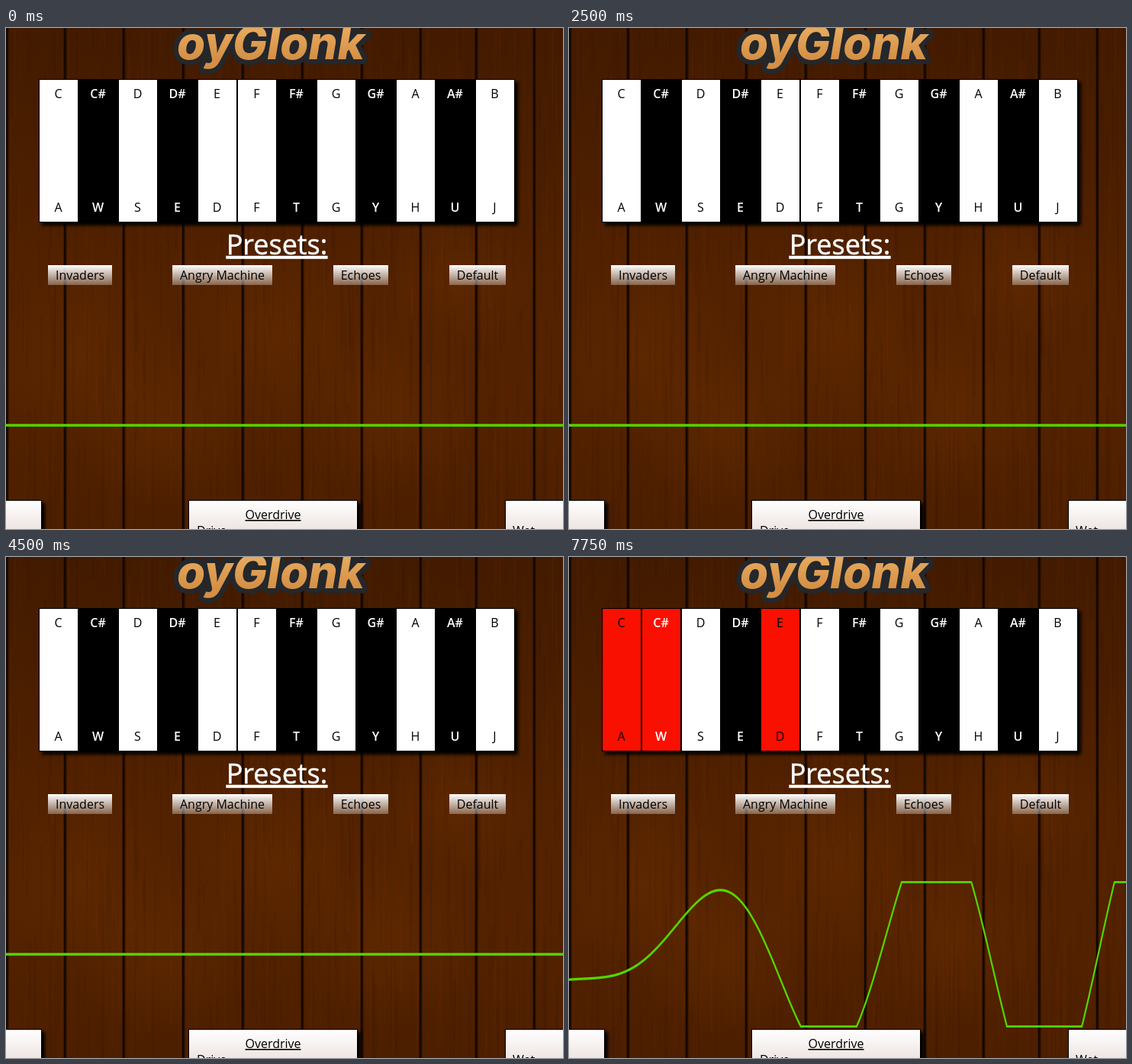
Write an HTML page with a canvas that moves like this. It is 730x657 px and loops after 8000 ms.

```html
<!DOCTYPE html>
<html lang="en">
<head>
<meta charset="utf-8">
<title>Synth keyboard</title>
<style>
  html, body { margin: 0; width: 100%; height: 100%; overflow: hidden; background: #4c1f00; }
  canvas, svg { position: absolute; left: 0; top: 0; }
  text { font: 16px "Open Sans", sans-serif; }
  .mid { text-anchor: middle; }
  .line { text-decoration: underline; }
  .sharp { font-weight: 600; fill: #fff; }
  .title { font-size: 36px; fill: #fff; stroke: #fff; stroke-width: .5px; }
  .logo { font: italic 800 60px Inter, sans-serif; fill: url(#gold); stroke: #24272b;
          stroke-width: 13px; stroke-linejoin: round; paint-order: stroke; }
  .shadow { filter: drop-shadow(4px 4px 2px #000); }
</style>
</head>
<body>
<canvas id="wood" width="730" height="657"></canvas>
<svg width="730" height="657" viewBox="0 0 730 657">
  <defs>
    <linearGradient id="gold" x2="0" y2="1">
      <stop offset=".2" stop-color="#e9ac60"/><stop offset=".8" stop-color="#d48f45"/>
    </linearGradient>
    <linearGradient id="glass" x2="0" y2="1">
      <stop stop-color="#fff"/><stop offset="1" stop-color="#fff" stop-opacity=".3"/>
    </linearGradient>
    <linearGradient id="panel" x2="0" y2="1">
      <stop stop-color="#fff"/><stop offset="1" stop-color="#ece3df"/>
    </linearGradient>
    <clipPath id="scope"><rect y="425" width="730" height="192"/></clipPath>
  </defs>
  <text class="logo mid" x="347" y="41">oyGlonk</text>
  <g class="shadow"><rect x="43" y="67" width="624" height="188"/></g>
  <g id="keys"></g>
  <text class="title mid line" x="355" y="297">Presets:</text>
  <g id="presets"></g>
  <g clip-path="url(#scope)">
    <path id="wave" transform="translate(0 521) scale(2.1 3.3)" fill="none" stroke="#54d600"/>
  </g>
  <g class="shadow" fill="url(#panel)" stroke="#000">
    <rect x="-20.5" y="619.5" width="67" height="42"/>
    <rect x="239.5" y="619.5" width="221" height="42"/>
    <rect x="654.5" y="619.5" width="100" height="42"/>
  </g>
  <text class="mid line" x="350" y="644">Overdrive</text>
  <text x="250" y="665">Drive</text>
  <text x="664" y="665">Wet</text>
</svg>
<script>
const LOOP = 8000, STEP = 250, RED = '#fa1000';
const $ = id => document.getElementById(id);

function add(parent, tag, attrs, text = '') {
  const el = document.createElementNS('http://www.w3.org/2000/svg', tag);
  for (const name in attrs) el.setAttribute(name, attrs[name]);
  el.textContent = text;
  return parent.appendChild(el);
}

// Wooden planks
function drawWood() {
  const g = $('wood').getContext('2d');
  let seed = 7;
  const rnd = () => (seed = seed * 16807 % 2147483647) / 2147483647;
  const fade = g.createLinearGradient(0, 0, 0, 657);
  ['#431b00', '#4a1e00', '#532200', '#532200', '#4c1f00'].forEach((c, i) => fade.addColorStop(i / 4, c));
  g.fillStyle = fade;
  g.fillRect(0, 0, 730, 657);
  for (const [x, y, r] of [[105, 430, 120], [350, 400, 130], [500, 500, 120], [590, 330, 100], [200, 520, 110]]) {
    const glow = g.createRadialGradient(x, y, 0, x, y, r);
    glow.addColorStop(0, 'rgba(120,55,5,.25)');
    glow.addColorStop(1, 'rgba(120,55,5,0)');
    g.fillStyle = glow;
    g.fillRect(x - r, y - r, 2 * r, 2 * r);
  }
  for (let i = 0; i < 900; i++) {
    g.fillStyle = rnd() < .5 ? 'rgba(25,8,0,.05)' : 'rgba(130,62,14,.05)';
    g.fillRect(rnd() * 730, rnd() * 720 - 90, 1 + rnd() * 3, 30 + rnd() * 140);
  }
  for (const x of [1, 77, 154, 232, 310, 388, 466, 543, 616, 692]) {
    g.fillStyle = 'rgba(20,7,0,.35)';
    g.fillRect(x - 2, 0, 5, 657);
    g.fillStyle = '#150700';
    g.fillRect(x - 1, 0, 2.5, 657);
  }
}
drawWood();

const notes = 'C C# D D# E F F# G G# A A# B'.split(' ');
const keys = notes.map((note, i) => {
  const sharp = note.length > 1, x = 43 + 52 * i;
  const box = add($('keys'), 'rect', { x: x + .5, y: 67.5, width: 51, height: 187, stroke: '#000' });
  const label = { class: sharp ? 'mid sharp' : 'mid', x: x + 25.5 };
  add($('keys'), 'text', { ...label, y: 92 }, note);
  add($('keys'), 'text', { ...label, y: 241 }, 'AWSEDFTGYHUJ'[i]);
  return { box, color: sharp ? '#000' : '#fff' };
});

[[55, 84, 'Invaders'], [218, 131, 'Angry Machine'], [429, 72, 'Echoes'], [581, 74, 'Default']]
  .forEach(([x, width, name]) => {
    add($('presets'), 'rect', { x, y: 311, width, height: 26, fill: 'url(#glass)' });
    add($('presets'), 'text', { class: 'mid', x: x + width / 2, y: 330 }, name);
  });

// Each tone: key, starting phase, phase advance per step
const chords = [
  { from: 500, to: 2500, amp: 73.5, tones: [[7, -.72, 2.607]] },
  { from: 2750, to: 4500, amp: 75, tones: [[9, -.764, 2.1]] },
  { from: 5250, to: 7250, amp: 72.5, tones: [[0, -1.262, 1.436], [4, .331, 1.978], [7, 2.805, 2.607]] },
  { from: 7750, to: 8000, amp: 72.5, tones: [[0, -2.425, 1.436], [1, 2.341, 1.7], [4, -.119, 1.978]] },
];

function wavePath(chord, step) {
  if (!chord) return 'M0 0H406';
  let d = '';
  for (let x = -2; x <= 732; x++) {
    let sum = 0;
    for (const [key, phase, advance] of chord.tones)
      sum += Math.cos(.029778 * 2 ** ((key - 7) / 12) * x + phase + advance * step);
    const y = Math.max(-95, Math.min(95, -chord.amp * sum));
    d += `${d ? 'L' : 'M'}${(x / 2.1).toFixed(2)} ${(y / 3.3).toFixed(2)}`;
  }
  return d;
}

let shown = -1;
function frame() {
  const t = Math.floor(performance.now() % LOOP / STEP) * STEP;
  if (t !== shown) {
    shown = t;
    const chord = chords.find(c => t >= c.from && t < c.to);
    keys.forEach(({ box, color }, i) =>
      box.setAttribute('fill', chord && chord.tones.some(([key]) => key === i) ? RED : color));
    $('wave').setAttribute('d', wavePath(chord, chord && (t - chord.from) / STEP));
  }
  requestAnimationFrame(frame);
}
frame();
</script>
</body>
</html>
```
